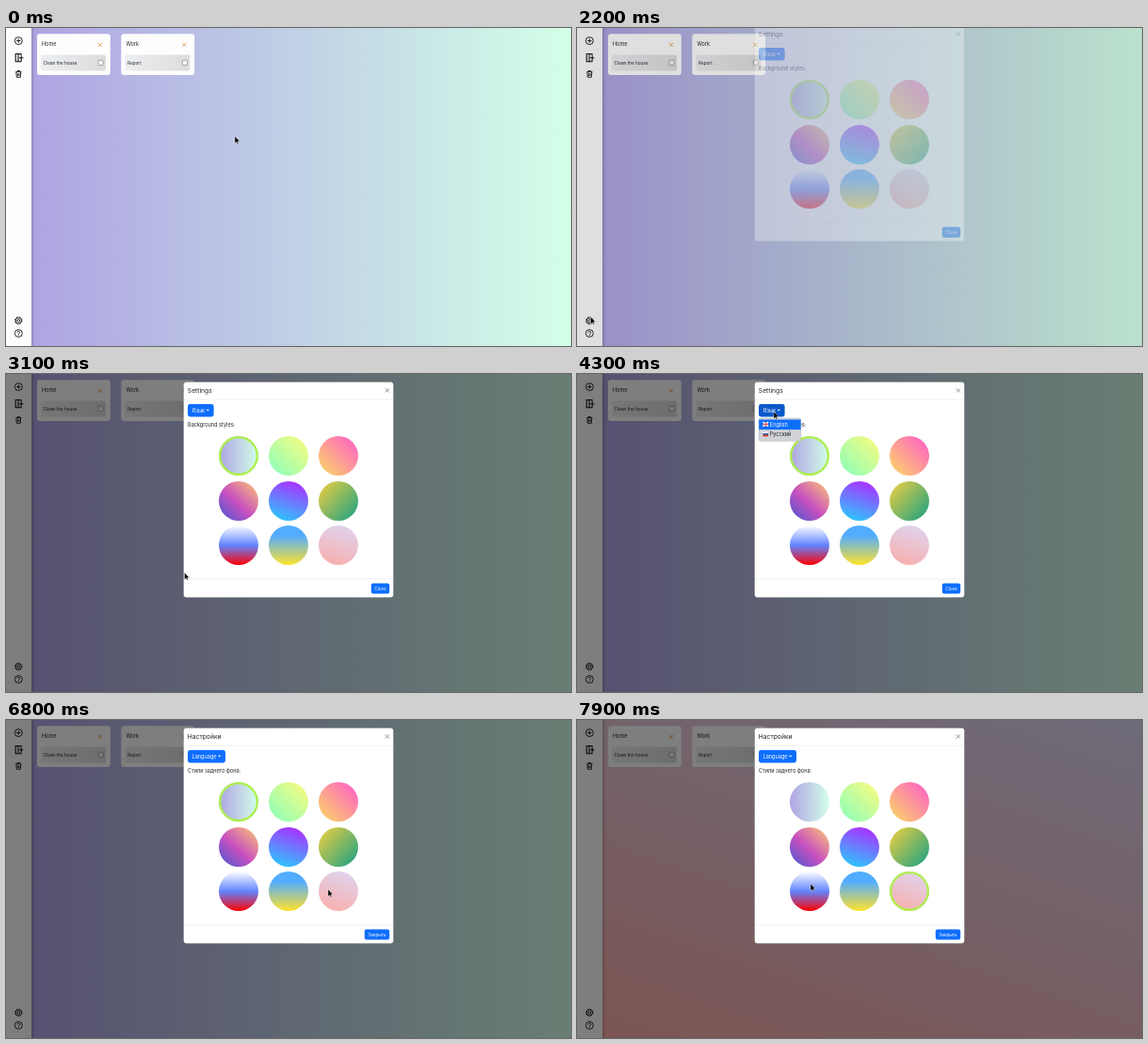
Animation of 600x338 px, one loop 8000 ms. Source, as an HTML page:

```html
<!DOCTYPE html>
<html lang="en">
<head>
<meta charset="utf-8">
<title>Task board settings</title>
<style>
  html, body { margin: 0; width: 100%; height: 100%; overflow: hidden; }
  #stage { position: relative; width: 600px; height: 338px; overflow: hidden; }
  #stage > *, #modal > * { position: absolute; left: 0; top: 0; }
  svg { width: 600px; height: 338px; overflow: visible; }
  text { font-family: Inter, sans-serif; font-size: 5.55px; fill: #212529; }
  #board { left: 27px !important; width: 573px; height: 338px; }
  #dim { width: 600px; height: 338px; background: #000; }
  #circles i { position: absolute; width: 42px; height: 42px; border-radius: 50%; }
  #circles i.on { box-shadow: inset 0 0 0 2.3px #adf04a; }
  .line { fill: none; stroke: #111; stroke-width: .9; }
  .small { font-size: 4.7px; }
  .title { font-size: 6.75px; }
  .light { fill: #fff; }
  .blue { fill: #0d6efd; }
</style>
</head>
<body>
<div id="stage">
  <div id="board"></div>
  <svg>
    <defs>
      <linearGradient id="row"><stop stop-color="#eceef0"/><stop offset="1" stop-color="#dcdcde"/></linearGradient>
      <linearGradient id="edge"><stop stop-color="#000" stop-opacity=".16"/><stop offset="1" stop-opacity="0"/></linearGradient>
      <g id="card">
        <rect x="33" y="6.3" width="77.8" height="43.7" rx="3" fill="#fdfdfd"/>
        <rect x="37" y="28.5" width="69" height="17" rx="2" fill="url(#row)"/>
        <rect x="98" y="34.3" width="5.2" height="5.2" rx=".8" fill="#f8f8f8" stroke="#888" stroke-width=".7"/>
        <path d="M98 15.8l4 4m0-4l-4 4" stroke="#e3a04c" stroke-width=".9"/>
      </g>
    </defs>
    <rect x="27" width="4" height="338" fill="url(#edge)"/>
    <rect width="27" height="338" fill="#fdfdfd"/>
    <g class="line">
      <circle cx="13.3" cy="13.6" r="4"/><path d="M13.3 11.4v4.4M11.1 13.6h4.4"/>
      <path d="M16 29.3V27.5H10.2V35.7H16V34M13 27.5v8.2M14 31.7h4.4M16.2 29.5v4.4" stroke-width="1.1"/>
      <path d="M10.2 46.7h6.2M12 46.5v-1h2.6v1M10.9 46.9l.4 5.4h4l.4-5.4M12.6 48.2v2.8M14 48.2v2.8"/>
      <circle cx="13.3" cy="311" r="3.2"/><circle cx="13.3" cy="311" r="1.4"/>
      <circle cx="13.3" cy="311" r="3.8" stroke-dasharray="1.5 1.485"/>
      <circle cx="13.3" cy="324.5" r="4"/>
      <path d="M12 323.6c0-1.8 2.7-1.7 2.7 0 0 .9-1.4.9-1.4 2M13.3 326.2v.9"/>
    </g>
    <use href="#card"/><use href="#card" x="89.3"/>
    <text x="38" y="18.8">Home</text><text x="127.4" y="18.8">Work</text>
    <text class="small" x="39.6" y="38.7">Clean the house</text><text class="small" x="129" y="38.7">Report</text>
  </svg>

  <div id="dim"></div>

  <div id="modal">
    <svg>
      <rect x="188.6" y="8.4" width="222.8" height="229.2" rx="3" fill="#fff" stroke="#0004" stroke-width=".4"/>
      <path d="M188.8 27.2h222.4M188.8 217.9h222.4" stroke="#dee2e6" stroke-width=".5"/>
      <path d="M402.8 15.4l4.2 4.2m0-4.2l-4.2 4.2" stroke="#777" stroke-width=".8"/>
      <text id="title" class="title" x="192.8" y="20.3"></text>
      <rect id="langButton" x="193" y="32" height="13.4" rx="2.4"/>
      <text id="lang" class="light" x="197.6" y="40.8"></text>
      <path id="caret" class="light" d="M-1.7 37.8h3.4l-1.7 1.8z"/>
      <text id="label" x="193" y="56"></text>
      <rect id="closeButton" class="blue" y="222.4" height="11.2" rx="2"/>
      <text id="close" class="small light" y="229.7" text-anchor="middle"></text>
    </svg>
    <div id="circles"></div>
    <svg id="menu">
      <rect x="193" y="46.8" width="44.8" height="24.6" rx="2" fill="#d0d2d6" stroke="#0003" stroke-width=".4"/>
      <rect class="blue" x="193.2" y="48.5" width="44.4" height="10.6"/>
      <rect x="197.5" y="51" width="5.6" height="4.8" fill="#2a4a9c"/>
      <path d="M197.5 51l5.6 4.8m0-4.8l-5.6 4.8M200.3 51v4.8M197.5 53.4h5.6" stroke="#fff" stroke-width="1.5"/>
      <path d="M200.3 51v4.8M197.5 53.4h5.6" stroke="#d8283c" stroke-width=".9"/>
      <path d="M197.5 62.3h5.6" stroke="#fff" stroke-width="1.6"/>
      <path d="M197.5 63.9h5.6" stroke="#2448a8" stroke-width="1.6"/>
      <path d="M197.5 65.5h5.6" stroke="#d52b1e" stroke-width="1.6"/>
      <text class="light" x="204.8" y="55.7">English</text>
      <text x="204.8" y="66.2">Русский</text>
    </svg>
  </div>

  <svg id="status">
    <path d="M-1 339V331H45q2 0 2 2V339z" fill="#fff" stroke="#bbb" stroke-width=".5"/>
    <text x="1" y="336.4" style="font: 4.7px 'Open Sans', sans-serif">localhost:3000/app#</text>
  </svg>
  <svg id="cursor">
    <path d="M0 0V7.6L1.7 6.1 2.8 8.3 3.9 7.8 2.9 5.6H5.2z" fill="#000" stroke="#fff" stroke-width=".4"/>
  </svg>
</div>

<script>
const $ = id => document.getElementById(id);
const styles = [
  '90deg, #aea4e3, #d3ffe8', '45deg, #85ffbd, #fffb7d', '45deg, #fbda61, #ff5acd',
  '43deg, #4158d0, #c850c0 46%, #ffcc70', '19deg, #21d4fd, #b721ff', '132deg, #f4d03f, #16a085',
  '180deg, #fff, #6284ff 50%, #f00', '180deg, #52acff 25%, #ffe32c', '19deg, #faaca8, #ddd6f3'
].map(s => `linear-gradient(${s})`);

const circles = styles.map((style, i) => {
  const el = $('circles').appendChild(document.createElement('i'));
  el.style.cssText = `left:${226 + i % 3 * 53}px;top:${66 + Math.floor(i / 3) * 47.6}px;background:${style}`;
  return el;
});

const locales = {
  en: { title: 'Settings', lang: 'Язык', label: 'Background styles:', close: 'Close', langWidth: 27.6, closeWidth: 19.4 },
  ru: { title: 'Настройки', lang: 'Language', label: 'Стили заднего фона:', close: 'Закрыть', langWidth: 40, closeWidth: 26.4 }
};

// time, x, y of the pointer tip
const path = [
  [0, 243, 115], [200, 243, 115], [900, 214, 132], [1800, 14.5, 307], [2300, 14.5, 307],
  [3000, 189.5, 211], [3200, 189.5, 211], [3900, 209, 40], [4600, 209, 40], [5000, 214, 64],
  [5500, 214, 64], [6500, 342, 180], [7200, 342, 180], [7900, 248, 174], [8000, 248, 174]
];
const clamp = v => Math.min(1, Math.max(0, v));

function pointer(t) {
  const i = path.findIndex(p => p[0] > t);
  const [t0, x0, y0] = path[i - 1], [t1, x1, y1] = path[i];
  const k = (t - t0) / (t1 - t0), e = k * k * (3 - 2 * k);
  return [x0 + (x1 - x0) * e, y0 + (y1 - y0) * e];
}

function showLocale({ langWidth, closeWidth, ...texts }) {
  for (const id in texts) $(id).textContent = texts[id];
  $('langButton').setAttribute('width', langWidth);
  $('caret').setAttribute('transform', `translate(${193 + langWidth - 6.3} 0)`);
  $('closeButton').setAttribute('x', 407.2 - closeWidth);
  $('closeButton').setAttribute('width', closeWidth);
  $('close').setAttribute('x', 407.2 - closeWidth / 2);
}

function render(t) {
  const [x, y] = pointer(t);
  const between = (a, b) => t >= a && t < b;
  const show = (id, on) => $(id).style.display = on ? '' : 'none';
  $('cursor').style.transform = `translate(${x}px, ${y}px)`;

  const slide = (1 - clamp((t - 2110) / 300)) ** 2;
  $('dim').style.opacity = clamp((t - 2165) / 150) / 2;
  $('modal').style.opacity = clamp((t - 2150) / 150);
  $('modal').style.transform = `translateY(${-22.3 * slide}px)`;

  const russian = t >= 5200;
  showLocale(russian ? locales.ru : locales.en);
  const hover = x > 193 && x < 220 && y > 32 && y < 45;
  $('langButton').setAttribute('fill', hover ? '#0b58ca' : '#0d6efd');
  show('menu', between(4100, 5200));
  show('status', between(4900, 5600));

  const selected = t < 7000 ? 0 : 8;
  $('board').style.background = styles[selected];
  circles.forEach((el, i) => el.className = i === selected ? 'on' : '');
}

function tick(now) {
  render(Math.floor(now % 8000 / 100) * 100);
  requestAnimationFrame(tick);
}
tick(performance.now());
</script>
</body>
</html>
```
